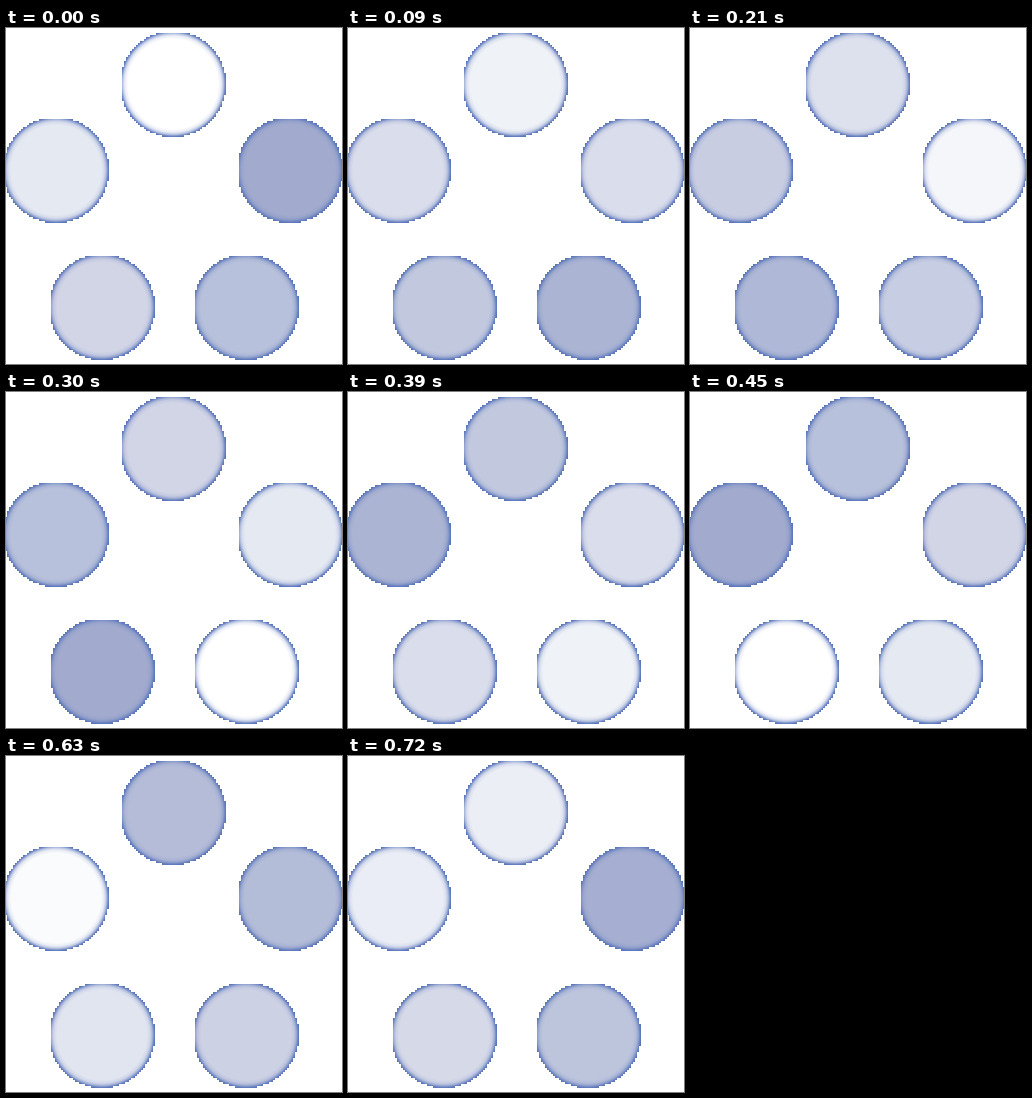
Recreate the animation shown at these times as an HTML page. Size 336 by 336 pixels, loop 750 ms.

```html
<!DOCTYPE html>
<html lang="en">
<head>
<meta charset="utf-8">
<title>Loader</title>
<style>
  html, body { margin: 0; width: 100%; height: 100%; overflow: hidden; background: #fff; }
  svg { display: block; width: 336px; height: 336px; }
  .fill { animation: shade 750ms steps(5, end) infinite; animation-delay: calc((var(--i) - 5) * 150ms); }
  @keyframes shade {
    0%, 100% { fill: #ffffff; }
    20% { fill: #e5e9f2; }
    40% { fill: #d2d5e6; }
    60% { fill: #b8c1db; }
    80% { fill: #a2abce; }
  }
</style>
</head>
<body>
<svg viewBox="0 0 336 336" shape-rendering="crispEdges">
  <defs>
    <radialGradient id="rim" gradientUnits="userSpaceOnUse" cx="51" cy="51" r="53">
      <stop offset=".85" stop-color="#5b76bb" stop-opacity="0"/>
      <stop offset=".91" stop-color="#5b76bb" stop-opacity=".13"/>
      <stop offset=".95" stop-color="#5b76bb" stop-opacity=".42"/>
      <stop offset=".98" stop-color="#5b76bb" stop-opacity=".82"/>
      <stop offset="1" stop-color="#5b76bb"/>
    </radialGradient>
    <path id="disc"/>
  </defs>
  <g id="ring"></g>
</svg>
<script>
  const C = 51, R = 53, SIZE = 104, STEP = 2;
  const snap = v => Math.round(v / STEP) * STEP;

  // Stepped disc, cut flat at the top and left of its box
  let d = '';
  for (let y = 0; y < SIZE; y += STEP) {
    const half = Math.sqrt(R * R - (y + STEP / 2 - C) ** 2);
    const left = Math.max(0, snap(C - half));
    const right = Math.min(SIZE, snap(C + half));
    d += `M${left} ${y}H${right}v${STEP}H${left}z`;
  }
  document.getElementById('disc').setAttribute('d', d);

  // Clockwise from the top
  const spots = [[116, 5], [233, 91], [189, 228], [45, 228], [-1, 91]];
  document.getElementById('ring').innerHTML = spots.map(([x, y], i) =>
    `<g transform="translate(${x} ${y})">
      <use href="#disc" class="fill" style="--i:${i}"/>
      <use href="#disc" fill="url(#rim)"/>
    </g>`).join('');
</script>
</body>
</html>
```
